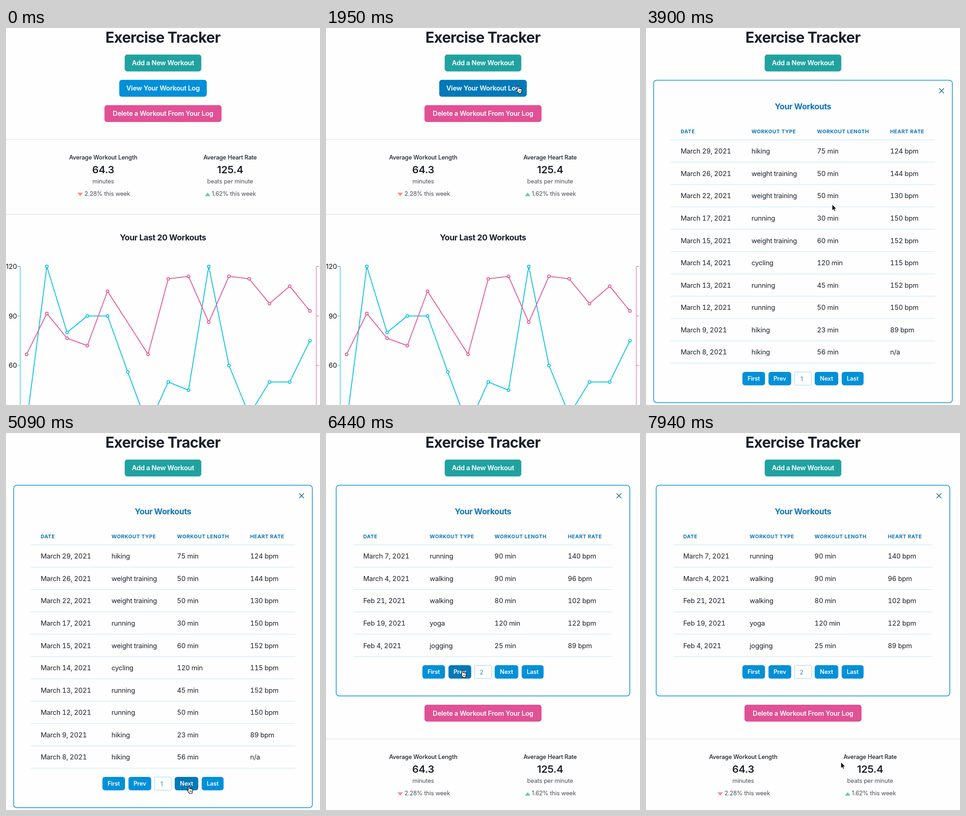
Animation, 683 px wide and 820 px high, one loop 8 s. Source, as an HTML page:

```html
<!DOCTYPE html>
<html lang="en">
<head>
<meta charset="utf-8">
<title>Exercise Tracker</title>
<style>
html, body { margin: 0; width: 100%; height: 100%; overflow: hidden; background: #fefefe; }
svg { display: block; width: 100vw; height: 100vh; font-family: Inter, "Open Sans", sans-serif; }
text { fill: #1a202c; white-space: pre; }
.title { font-size: 32px; font-weight: 700; letter-spacing: -.02em; }
.head { font-size: 17.6px; font-weight: 700; letter-spacing: -.02em; }
.btn { font-size: 14.67px; font-weight: 600; letter-spacing: -.02em; fill: #fff; }
.small { font-size: 12.83px; font-weight: 600; letter-spacing: -.012em; fill: #fff; }
.th { font-size: 11px; font-weight: 700; letter-spacing: .05em; }
.td { font-size: 14.67px; letter-spacing: -.015em; font-variant-numeric: lining-nums tabular-nums; }
.label { font-size: 12.83px; font-weight: 500; letter-spacing: -.012em; }
.value { font-size: 22px; font-weight: 600; letter-spacing: -.005em; }
.note { font-size: 12.83px; letter-spacing: -.01em; fill: #484d56; }
.tick { font-size: 14.67px; fill: #111; }
.head.blue, .th { fill: #0d75b8; }
.page { font-size: 12.83px; fill: #1e87c5; }
</style>
</head>
<body>
<svg id="stage" viewBox="0 0 683 820"></svg>
<script>
const NS = 'http://www.w3.org/2000/svg';
const stage = document.getElementById('stage');
const BLUE = [0, 144, 217], DARK = [0, 121, 185], PRESSED = [12, 107, 173];
const CYAN = '#00bfdd', PINK = '#e25096', LOOP = 8000;

const log = [
  ['March 29', 'hiking', 75, 124], ['March 26', 'weight training', 50, 144],
  ['March 22', 'weight training', 50, 130], ['March 17', 'running', 30, 150],
  ['March 15', 'weight training', 60, 152], ['March 14', 'cycling', 120, 115],
  ['March 13', 'running', 45, 152], ['March 12', 'running', 50, 150],
  ['March 9', 'hiking', 23, 89], ['March 8', 'hiking', 56, null],
  ['March 7', 'running', 90, 140], ['March 4', 'walking', 90, 96],
  ['Feb 21', 'walking', 80, 102], ['Feb 19', 'yoga', 120, 122],
  ['Feb 4', 'jogging', 25, 89]
];

function add(parent, tag, attrs, text) {
  const el = document.createElementNS(NS, tag);
  for (const k in attrs) el.setAttribute(k, attrs[k]);
  if (text !== undefined) el.textContent = text;
  parent.appendChild(el);
  return el;
}
const group = parent => add(parent, 'g', {});
const label = (parent, cls, x, y, text, anchor = 'start') =>
  add(parent, 'text', { class: cls, x, y, 'text-anchor': anchor }, text);
const line = (parent, d, stroke, width) =>
  add(parent, 'path', { d, stroke, 'stroke-width': width, fill: 'none', 'stroke-linejoin': 'round' });
const rgb = c => `rgb(${c.map(Math.round)})`;

function button(parent, cls, x, y, width, height, fill, text) {
  const rect = add(parent, 'rect', { x, y, width, height, rx: 5.5, fill });
  label(parent, cls, x + width / 2, y + height / 2 + (cls === 'btn' ? 5.3 : 4.7), text, 'middle');
  return rect;
}

function stat(parent, cx, name, value, unit, noteX, note, arrow, color) {
  label(parent, 'label', cx, 286, name, 'middle');
  label(parent, 'value', cx, 315.6, value, 'middle');
  label(parent, 'note', cx, 338.2, unit, 'middle');
  label(parent, 'note', noteX, 364.8, note);
  add(parent, 'path', { d: arrow, fill: color, stroke: color, 'stroke-linejoin': 'round' });
}

function series(parent, values, top, scale, color) {
  const pts = values.map((v, i) => v === null ? null : [44.8 + 44.02 * i, 518.6 + (top - v) * scale])
    .filter(Boolean);
  line(parent, 'M' + pts.map(p => p.join(' ')).join('L'), color, 1.8);
  return () => pts.forEach(([cx, cy]) =>
    add(parent, 'circle', { cx, cy, r: 2.9, fill: '#fff', stroke: color, 'stroke-width': 1.7 }));
}

function buildLower() {
  const g = group(stage);
  button(g, 'btn', 214.2, 167.8, 254.6, 36.6, PINK, 'Delete a Workout From Your Log');
  for (const y of [241.2, 404.2]) add(g, 'rect', { x: 0, y, width: 683, height: 2.3, fill: '#eeebfb' });
  stat(g, 211.5, 'Average Workout Length', '64.3', 'minutes', 170.8, '2.28% this week',
    'M156.2 358.7H166.4L161.3 365.2Z', '#fc8f8b');
  stat(g, 487.5, 'Average Heart Rate', '125.4', 'beats per minute', 447.4, '1.62% this week',
    'M433.6 365.3H443.8L438.7 358.4Z', '#68cfa0');
  label(g, 'head', 341.5, 461.8, 'Your Last 20 Workouts', 'middle');

  const ticks = [518.6, 626.2, 734];
  line(g, 'M31 518.6V860' + ticks.map(y => `M25 ${y}h6`).join(''), CYAN, 1.1);
  line(g, 'M675 518.6V860' + ticks.map(y => `M675 ${y}h6`).join(''), PINK, 1);
  ticks.forEach((y, i) => label(g, 'tick', 24, y + 5.3, 120 - 30 * i, 'end'));
  const days = [...log].reverse();
  const dots = [series(g, days.map(d => d[2]), 120, 3.59, CYAN),
    series(g, days.map(d => d[3]), 160, 2.693, PINK)];
  dots.forEach(draw => draw());
  return g;
}

function buildPanel(page, rows, x, cols, inset) {
  const g = group(stage), w = 683 - 2 * x, step = 48.58;
  const end = 243.3 + step * rows.length, close = 659.5 - x;
  add(g, 'rect', { x, y: 113.7, width: w, height: end - 28, rx: 6.5, fill: '#fefefe',
    stroke: '#2b9fdc', 'stroke-width': 1.8 });
  line(g, `M${close - 5.2} 131.3l10.4 10.4m0-10.4l-10.4 10.4`, '#1a5f96', 1.5);
  label(g, 'head blue', 341.5, 176.9, 'Your Workouts', 'middle');
  ['DATE', 'WORKOUT TYPE', 'WORKOUT LENGTH', 'HEART RATE'].forEach((t, i) =>
    label(g, 'th', cols[i], 229, t));
  for (let i = 0; i <= rows.length; i++)
    line(g, `M${inset} ${243.3 + step * i}H${683 - inset}`, '#bfe6f7', 1);
  rows.forEach(([date, type, min, bpm], i) => {
    const cells = [date + ', 2021', type, min + ' min', bpm === null ? 'n/a' : bpm + ' bpm'];
    cells.forEach((t, k) => label(g, 'td', cols[k], 273.2 + step * i, t));
  });
  const y = end + 18.8, nav = {};
  [['First', 209.7, 49.2], ['Prev', 266.4, 49.4], ['Next', 367, 51.2], ['Last', 425.7, 47.6]]
    .forEach(([t, bx, bw]) => nav[t] = button(g, 'small', bx, y, bw, 29.3, rgb(BLUE), t));
  add(g, 'rect', { x: 323.5, y: y + .4, width: 36, height: 28.6, rx: 1.5, fill: '#fff',
    stroke: page === 1 ? '#97d8f4' : '#a9c9df' });
  label(g, 'page', 338.5, y + 19.6, page, 'middle');
  return { g, nav };
}

label(stage, 'title', 341.3, 32, 'Exercise Tracker', 'middle');
button(stage, 'btn', 258.2, 57.8, 166.6, 36.6, '#20a2a0', 'Add a New Workout');
const lower = buildLower();
const viewGroup = group(stage);
const view = button(viewGroup, 'btn', 246.3, 112.8, 190.4, 36.6, rgb(BLUE), 'View Your Workout Log');
const panels = [
  buildPanel(1, log.slice(0, 10), 16.6, [75.5, 229.5, 372, 531], 54),
  buildPanel(2, log.slice(10), 22.2, [81, 225.5, 366.6, 525.9], 59.6)
];

const cursor = group(stage);
const shapes = { arrow: group(cursor), hand: group(cursor), beam: group(cursor) };
add(shapes.arrow, 'path', { d: 'M0 0V13.2L3 10.5L5 15L7.2 14L5.2 9.7H9.2Z', fill: '#000',
  stroke: '#fff', 'stroke-width': .9 });
add(shapes.hand, 'path', {
  d: 'M-1.4 9V1.2a1.3 1.3 0 0 1 2.6 0V5.6q1.3-1 2.4.3q1.4-.8 2.3.5q2-.6 2.1 1.3V11q0 2-1.4 3.8V16H.6V15q-2.2-2-4.3-6.2q.4-2 2.3.2Z',
  fill: '#fff', stroke: '#000', 'stroke-width': 1.1, 'stroke-linejoin': 'round' });
line(shapes.hand, 'M1.8 9.5v3.2m2-3.2v3.2m2-3.2v3.2', '#000', .8);
const beam = 'M-2.8-6.6Q0-6.6 0-4.6Q0-6.6 2.8-6.6M0-5V5M-2.8 6.6Q0 6.6 0 4.6Q0 6.6 2.8 6.6M-1.6 1.5H1.6';
line(shapes.beam, beam, '#fff', 3);
line(shapes.beam, beam, '#222', 1.1);

// Pointer path: time, x, y
const path = [
  [600, 623, 143], [1500, 418, 126], [3150, 418, 126], [3300, 424, 165], [3450, 434, 265],
  [3600, 419, 351], [3750, 419, 351], [4350, 329, 560], [4650, 378, 752], [4940, 400, 761],
  [5090, 398, 768], [5690, 398, 768], [6290, 297, 516], [6740, 297, 516],
  [7490, 457, 763], [7640, 457, 763], [7790, 446, 737], [7940, 424, 716]
];
const looks = [[0, 'arrow'], [1800, 'hand'], [2550, 'arrow'], [5090, 'hand'], [5540, 'arrow'],
  [6290, 'hand'], [6740, 'arrow'], [7490, 'beam'], [7790, 'arrow']];
const pages = [[0, 0], [2400, 1], [5390, 2], [6590, 1], [7640, 2]];
const hovers = [[view, 1800, 2400], [panels[0].nav.Next, 4650, 5390],
  [panels[1].nav.Prev, 6140, 6590], [panels[0].nav.Last, 7190, 7640]];

const at = (list, t) => list.filter(k => k[0] <= t).pop()[1];
const show = (el, on) => el.setAttribute('display', on ? 'inline' : 'none');

function position(t) {
  const i = path.findIndex(k => k[0] > t);
  if (i < 0) return path[path.length - 1].slice(1);
  const a = path[Math.max(i - 1, 0)], b = path[i];
  const u = Math.max(0, (t - a[0]) / (b[0] - a[0])), e = u * u * (3 - 2 * u);
  return [a[1] + (b[1] - a[1]) * e, a[2] + (b[2] - a[2]) * e];
}

// The screen refreshes in steps of 150 ms
function snap(t) {
  const start = t < 4940 ? 0 : 4940;
  return start + Math.floor((t - start) / 150) * 150;
}

function render(now) {
  const t = snap(now % LOOP), page = at(pages, t), look = at(looks, t);
  show(viewGroup, page === 0);
  panels.forEach((p, i) => show(p.g, page === i + 1));
  lower.setAttribute('transform', `translate(0 ${[0, 666.2, 423.3][page]})`);
  for (const [el, from, to] of hovers) {
    const k = t < from || t >= to ? 0 : Math.min(1, (t - from + 150) / 300);
    const pressed = el === panels[0].nav.Last && t >= 7490 && t < to;
    el.setAttribute('fill', rgb(pressed ? PRESSED : BLUE.map((c, i) => c + (DARK[i] - c) * k)));
  }
  show(cursor, t >= 600);
  for (const name in shapes) show(shapes[name], name === look);
  cursor.setAttribute('transform', `translate(${position(t)})`);
}

let begin;
function loop(now) {
  begin ??= now;
  render(Math.max(0, now - begin));
  requestAnimationFrame(loop);
}
render(0);
requestAnimationFrame(loop);
</script>
</body>
</html>
```
